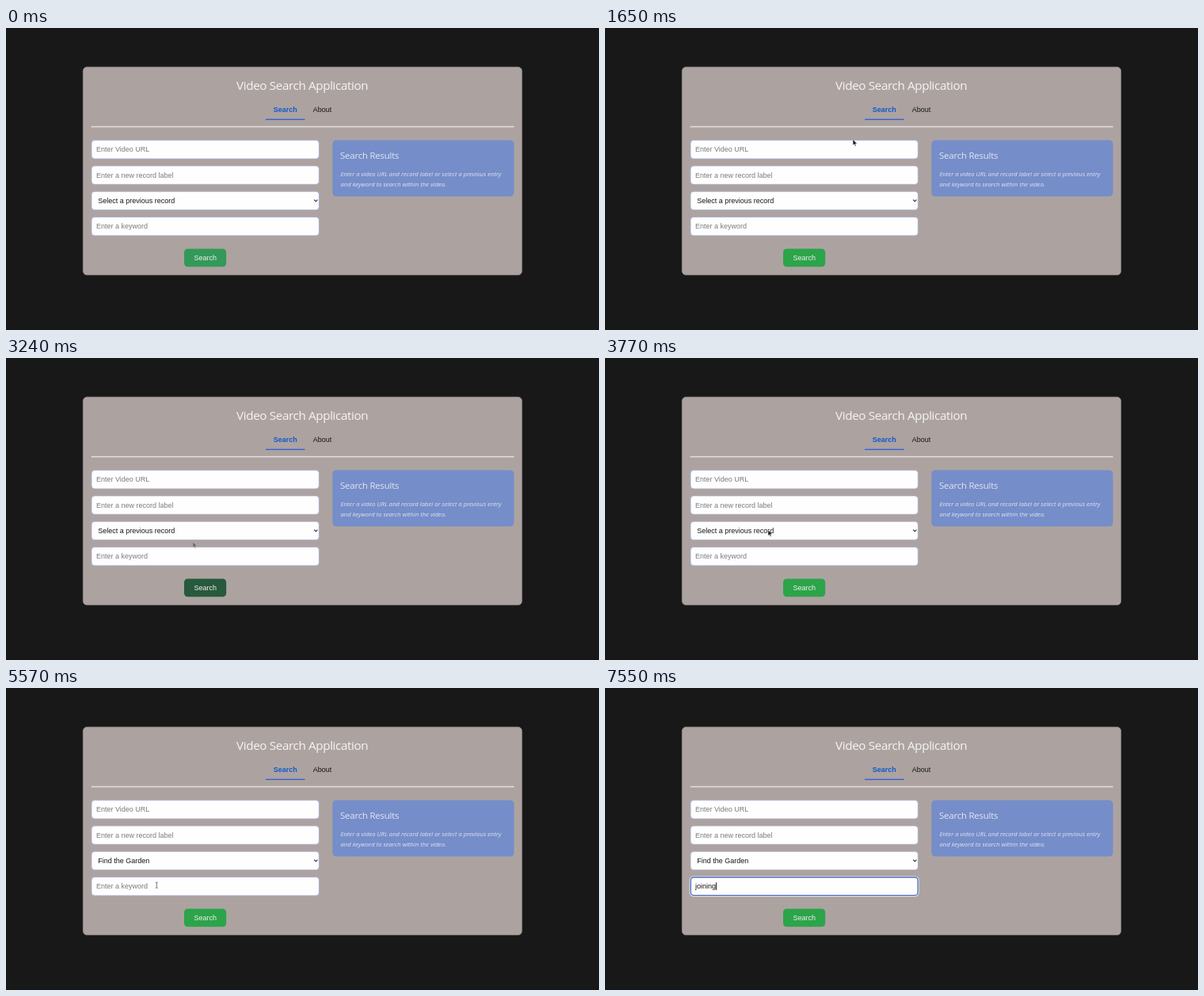
An HTML page for the animation above (8 s loop, 749 px wide and 381 px high).

```html
<!DOCTYPE html>
<html lang="en">
<head>
<meta charset="utf-8">
<title>Video Search Application</title>
<style>
  html, body { margin: 0; width: 100%; height: 100%; overflow: hidden; background: #181818; }
  svg { display: block; width: 100vw; height: 100vh; }
  text { font: 9px "Liberation Sans", Arial, sans-serif; white-space: pre; }
  .head { font-family: "Open Sans", "Noto Sans", sans-serif; fill: #f6f4f4; }
  .title { font-size: 15.3px; letter-spacing: -.41px; text-anchor: middle; }
  .sub { font-size: 11.5px; letter-spacing: -.24px; fill: #e3e5ef; }
  .hint { font-size: 7.7px; font-style: italic; fill: #e0e4f0; }
  .field { fill: #fefefe; stroke: #a4a9d0; stroke-width: .8; }
  .ghost { fill: #7b7b7b; }
  .ink { fill: #161616; }
</style>
</head>
<body>
<svg viewBox="0 0 749 381">
  <rect width="749" height="381" fill="#181818"/>
  <rect x="97.3" y="49.2" width="554.4" height="262.4" rx="5" fill="#aca3a1" stroke="#9c9492" stroke-width=".6"/>
  <text class="head title" x="374.2" y="77.6">Video Search Application</text>

  <text id="tab" x="337.7" y="106.3" font-weight="bold" style="font-weight:bold">Search</text>
  <text class="ink" x="387.8" y="106.3">About</text>
  <rect id="line" x="328" y="114.7" width="49.5" height="1.4"/>
  <rect x="107.7" y="123.8" width="534" height="1.5" fill="#e4dedf"/>

  <g id="fields"></g>
  <path d="M389.2 216.7l2.1 2.1 2.1-2.1" fill="none" stroke="#222" stroke-width="1.1"/>
  <g id="focus" fill="none">
    <rect x="107.4" y="238" width="288.6" height="24.4" rx="4.5" stroke="#d5dcf0" stroke-width="1.6"/>
    <rect x="108.3" y="238.9" width="286.8" height="22.6" rx="3.8" stroke="#3f5fb4" stroke-width="1.1"/>
  </g>
  <rect id="caret" y="245.3" width=".9" height="9.6" fill="#111"/>

  <rect x="412.4" y="141.4" width="229.2" height="71.2" rx="5" fill="#758dc9"/>
  <text class="head sub" x="422" y="165">Search Results</text>
  <text class="head hint" x="422.5" y="187.2">Enter a video URL and record label or select a previous entry</text>
  <text class="head hint" x="422.5" y="199.5">and keyword to search within the video.</text>

  <rect id="button" x="225" y="278.4" width="53.2" height="22.8" rx="4.5"/>
  <text x="237.5" y="293" fill="#f6eef1">Search</text>

  <g id="pointer">
    <path id="arrow" d="M0 0V7.2L1.7 5.7 2.9 8.3 4 7.8 2.9 5.3H5.1Z" fill="#161616" stroke="#ddd" stroke-width=".5"/>
    <path id="beam" d="M-1.5 -3.6Q0 -3.6 0 -2.8Q0 -3.6 1.5 -3.6M0 -2.8V2.8M-1.5 3.6Q0 3.6 0 2.8Q0 3.6 1.5 3.6" fill="none" stroke="#555" stroke-width=".8"/>
    <path id="hand" d="M-1.8 -4Q-.9 -4.8 -.3 -3.8V-1.6L2.8 -.9Q3.6 -.6 3.4 .6L2.6 4H-1.4L-3.8 .7Q-3.3 -.4 -1.8 .7Z" fill="#fff" stroke="#222" stroke-width=".8"/>
  </g>
</svg>
<script>
const LOOP = 8000;
const $ = id => document.getElementById(id);
const clamp = v => Math.max(0, Math.min(1, v));
const ease = v => v * v * (3 - 2 * v);

const labels = ["Enter Video URL", "Enter a new record label", "Select a previous record", "Enter a keyword"];
$("fields").innerHTML = labels.map((label, i) => {
  const y = 141.6 + i * 32.3;
  return `<rect class="field" x="108" y="${y}" width="287.4" height="23.4" rx="4"/>
    <text class="${i === 2 ? "ink" : "ghost"}" x="${i === 2 ? 116.2 : 114}" y="${y + 14.8}">${label}</text>`;
}).join("");
const [, , record, keyword] = $("fields").querySelectorAll("text");

// time, x, y, pointer shape until the next stop
const path = [
  [450, 251, 288, "hand"], [530, 285, 225, "arrow"], [720, 336, 108, "hand"],
  [870, 334, 105, "hand"], [930, 334, 105, "hand"], [1330, 400, 105, "hand"],
  [1480, 400, 105, "arrow"], [1700, 300, 146, "beam"], [1860, 265, 153, "beam"],
  [2320, 265, 153, "beam"], [2440, 265, 182, "beam"], [2470, 265, 182, "beam"],
  [2630, 262, 217, "arrow"], [2840, 262, 217, "arrow"], [3020, 251, 289, "hand"],
  [3090, 250, 289, "hand"], [3200, 236, 232, "arrow"], [3340, 236, 232, "arrow"],
  [3630, 206, 217, "arrow"], [5100, 206, 217, "arrow"], [5120, 190.5, 240, "arrow"],
  [5140, 190.5, 240, "arrow"], [5320, 184, 247, "arrow"], [5470, 184, 247, "beam"],
  [5670, 196.5, 250.5, "beam"], [6380, 196.5, 250.5, ""]
];

const typing = [[6280, "j"], [6480, "jo"], [6980, "joi"], [7010, "join"], [7190, "joini"], [7240, "joinin"], [7500, "joining"]];

const green = [44, 164, 74], muted = [51, 153, 88], dark = [48, 98, 62], darker = [39, 89, 60];
const shades = [[0, muted], [450, muted], [520, dark], [930, dark], [1080, green],
  [2950, green], [3040, darker], [3340, darker], [3480, green]];

const last = (list, t) => list.findLastIndex(k => k[0] <= t);

function shade(t) {
  const i = last(shades, t), [t0, a] = shades[i], [t1, b] = shades[i + 1] || [LOOP, a];
  const p = clamp((t - t0) / (t1 - t0));
  return `rgb(${a.map((v, n) => Math.round(v + (b[n] - v) * p))})`;
}

function movePointer(t) {
  const i = last(path, t), a = path[i], b = path[i + 1];
  for (const id of ["arrow", "beam", "hand"]) $(id).style.display = a && a[3] === id ? "" : "none";
  if (!b || !a) return;
  const p = ease(clamp((t - a[0]) / (b[0] - a[0])));
  $("pointer").setAttribute("transform", `translate(${a[1] + (b[1] - a[1]) * p} ${a[2] + (b[2] - a[2]) * p})`);
  $("pointer").style.opacity = t >= 3200 && t < 3340 ? .45 : 1;
}

function draw(t) {
  const hover = t >= 720 && t < 1000;
  $("tab").style.fill = hover ? "#4b78d2" : "#1159cb";
  $("line").style.fill = hover ? "#5579d4" : "#355fd5";
  $("button").style.fill = shade(t);

  record.textContent = t < 5470 ? labels[2] : "Find the Garden";
  const step = typing[last(typing, t)];
  keyword.textContent = step ? step[1] : labels[3];
  keyword.setAttribute("class", step ? "ink" : "ghost");

  const focused = t >= 5970;
  $("focus").style.display = $("caret").style.display = focused ? "" : "none";
  if (focused) $("caret").setAttribute("x", 114 + (step ? keyword.getComputedTextLength() : 0));
  movePointer(t);
}

let start;
function tick(now) {
  start ??= now;
  draw((now - start) % LOOP);
  requestAnimationFrame(tick);
}
draw(0);
requestAnimationFrame(tick);
</script>
</body>
</html>
```
